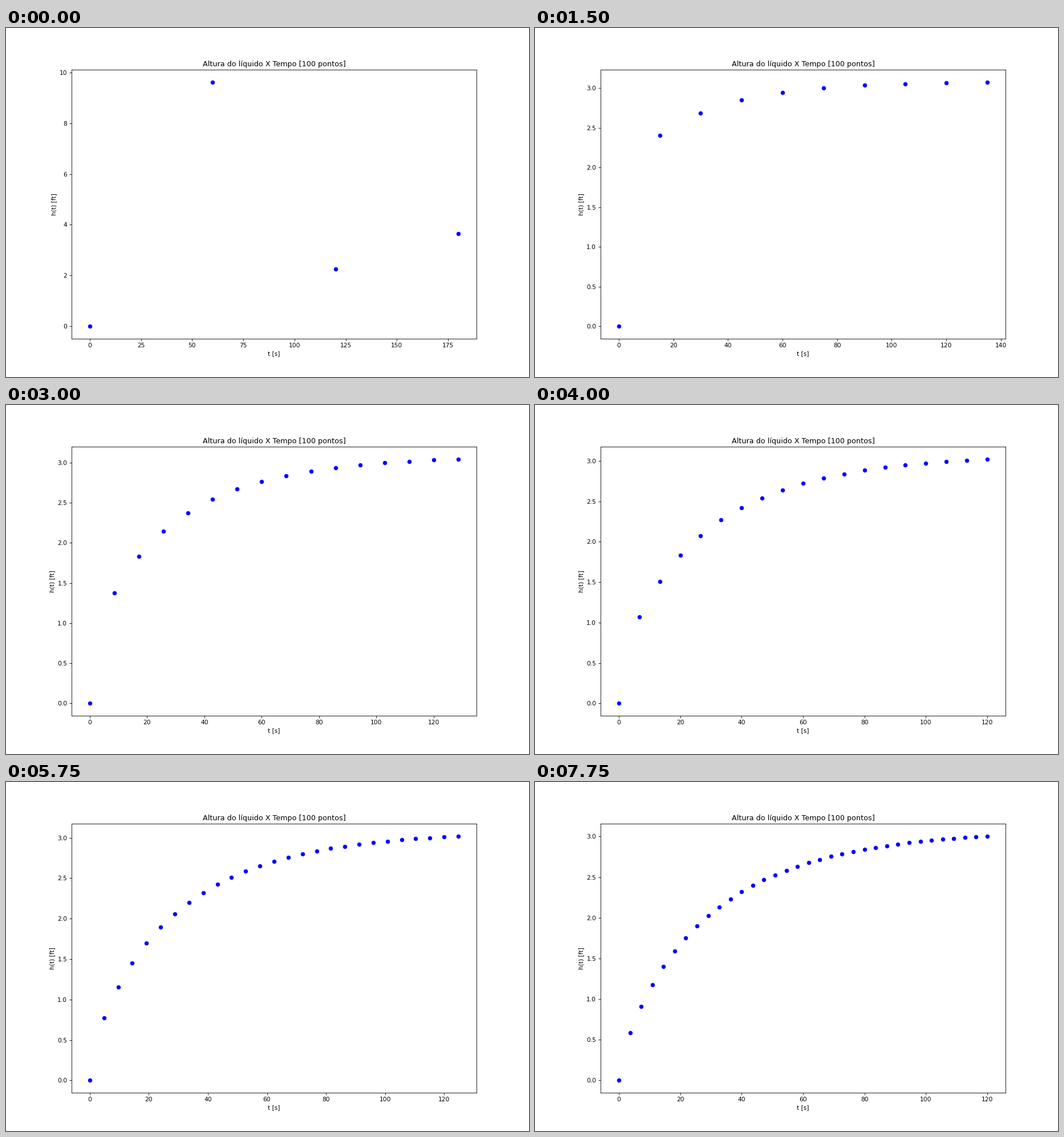
Animation of 917x611 px, one loop 8000 ms. Source, as a matplotlib script:

```python
import matplotlib.pyplot as plt
from matplotlib.animation import FuncAnimation

WIDTH, HEIGHT = 917, 611
DPI = WIDTH / 12     # a 12 by 8 inch figure
FRAMES, INTERVAL = 32, 250
T_END = 120          # simulated time in seconds
INFLOW = 0.16027     # ft/s
OUTFLOW = 0.09123    # ft^0.5/s


def euler(n):
    """Liquid height by Euler's method with step T_END / n."""
    dt = T_END / n
    t, h = 0.0, 0.0
    times, heights = [t], [h]
    # The accumulated rounding of t decides whether one extra step is taken.
    while t <= T_END:
        h += dt * (INFLOW - OUTFLOW * h ** 0.5)
        t += dt
        times.append(t)
        heights.append(h)
    return times, heights


plt.rcParams["font.family"] = "DejaVu Sans"

# The tiny margin keeps the pixel size from being truncated down.
fig, ax = plt.subplots(
    figsize=((WIDTH + 1e-6) / DPI, (HEIGHT + 1e-6) / DPI), dpi=DPI
)
ax.set_title("Altura do líquido X Tempo [100 pontos]")
ax.set_xlabel("t [s]")
ax.set_ylabel("h(t) [ft]")
points, = ax.plot([], [], "bo")


def update(i):
    points.set_data(*euler(i + 2))
    ax.relim()
    ax.autoscale_view()
    return points,


anim = FuncAnimation(
    fig, update, frames=FRAMES, interval=INTERVAL, repeat=True, repeat_delay=0
)
plt.show()
```
